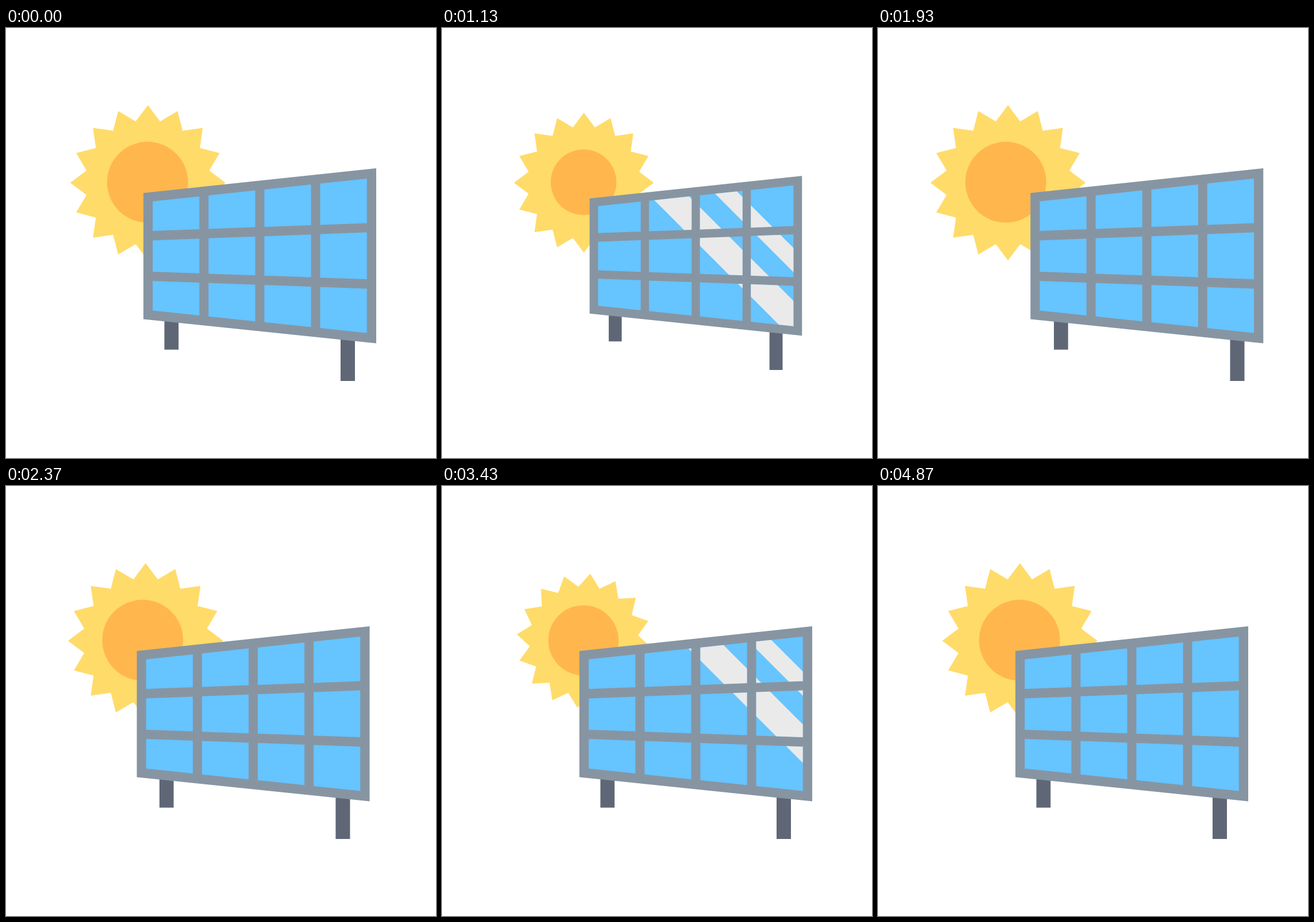
These frames come from a looping animation (748 px wide and 748 px high, 5 s). An HTML page with a canvas:

```html
<!DOCTYPE html>
<html lang="en">
<head>
<meta charset="utf-8">
<title>Solar panel</title>
<style>
  html, body { margin: 0; width: 100%; height: 100%; overflow: hidden; background: #fff; }
  canvas { display: block; }
</style>
</head>
<body>
<canvas id="stage" width="748" height="748"></canvas>
<script>
const ctx = document.getElementById('stage').getContext('2d');
const LOOP = 5000, FPS = 30;
const SUN = { x: 246.8, y: 269.2 }, PANEL = { x: 441.5, y: 396.3 };

// Symmetric ease, cubic-bezier(.5, 0, .5, 1), solved by bisection.
function ease(p) {
  let lo = 0, hi = 1;
  for (let i = 0; i < 24; i++) {
    const t = (lo + hi) / 2;
    if (1.5 * t * (1 - t) + t ** 3 < p) lo = t; else hi = t;
  }
  return lo * lo * (3 - 2 * lo);
}

// Eased value at frame n for the given key times and values.
function track(n, times, values) {
  if (n <= times[0]) return values[0];
  for (let i = 1; i < times.length; i++) {
    if (n < times[i]) {
      const p = (n - times[i - 1]) / (times[i] - times[i - 1]);
      return values[i - 1] + (values[i] - values[i - 1]) * ease(p);
    }
  }
  return values[values.length - 1];
}

const beat = start => [0, 15, 30, 45].map(k => start + k);
const pulse = (n, start) => track(n, beat(start), [1, 1.1, 0.9, 1]);
const sway = (n, start, amp) => track(n, beat(start), [0, amp, -amp, 0]);

function polygon(points) {
  const path = new Path2D();
  points.forEach(([x, y]) => path.lineTo(x, y));
  path.closePath();
  return path;
}

function fill(path, color) {
  ctx.fillStyle = color;
  ctx.fill(path);
}

const rays = polygon(Array.from({ length: 32 }, (_, i) => {
  const r = i % 2 ? 108.8 : 135, a = i * Math.PI / 16;
  return [r * Math.sin(a), -r * Math.cos(a)];
}));

const frame = polygon([[239, 287], [644, 244], [644, 548.5], [239, 506.5]]);

// Each row: top and bottom edge heights at the left and right end.
const rows = [
  [301.5, 262, 353, 339.5],
  [369.5, 355.5, 424, 437],
  [440, 453.5, 491.5, 530.5]
];
const cells = new Path2D();
for (const [t0, t1, b0, b1] of rows) {
  for (let col = 0; col < 4; col++) {
    const l = 255.2 + col * 97.1, r = l + 81.2;
    const at = (x, a, b) => a + (b - a) * (x - 255.2) / 372.5;
    cells.addPath(polygon([[l, at(l, t0, t1)], [r, at(r, t0, t1)],
                           [r, at(r, b0, b1)], [l, at(l, b0, b1)]]));
  }
}

function scaleAbout(c, s) {
  ctx.translate(c.x, c.y);
  ctx.scale(s, s);
  ctx.translate(-c.x, -c.y);
}

function drawSun(n) {
  const spin = [92, 107.5, 125, 146];
  const scale = pulse(n, 3) * track(n, spin, [1, 0.845, 1.235, 1]);
  ctx.save();
  ctx.translate(SUN.x + sway(n, 49, -29.9), SUN.y);
  ctx.scale(scale, scale);
  ctx.rotate(track(n, spin, [0, -20, 20, 0]) * Math.PI / 180);
  fill(rays, '#ffdb69');
  const disc = new Path2D();
  disc.arc(sway(n, 51, -7.5) - 0.6, -1, 70.4 * pulse(n, 5), 0, 7);
  fill(disc, '#ffb74d');
  ctx.restore();
}

// Diagonal band covering a <= x - y <= b.
const band = (a, b) => polygon([[a, 0], [b, 0], [b + 748, 748], [a + 748, 748]]);

function drawPanel(n) {
  ctx.save();
  ctx.translate(sway(n, 47, 29.9), 0);
  scaleAbout(PANEL, pulse(n, 0));

  ctx.save();
  ctx.translate(sway(n, 50, 7.5), 0);
  ctx.fillStyle = '#5f6777';
  ctx.fillRect(275.5, 490, 24.7, 69.5);
  ctx.fillRect(582, 520, 25, 94);
  ctx.restore();

  fill(frame, '#8795a2');
  fill(cells, '#66c4ff');
  ctx.clip(cells);
  // The glint crosses the stage at its own size, seen only through the cells.
  ctx.setTransform(1, 0, 0, 1, 0, 0);
  const edge = n < 75 ? 293 - 18.6 * (n - 22) : -133 - 18.6 * (n - 118);
  fill(band(edge, edge + 67), '#eaeaea');
  fill(band(edge + 117, edge + 159), '#eaeaea');
  ctx.restore();
}

function draw(now) {
  const n = Math.floor((now % LOOP + 4) * FPS / 1000);
  ctx.fillStyle = '#fff';
  ctx.fillRect(0, 0, 748, 748);
  drawSun(n);
  drawPanel(n);
}

let start;
function tick(now) {
  start ??= now;
  draw(now - start);
  requestAnimationFrame(tick);
}
draw(0);
requestAnimationFrame(tick);
</script>
</body>
</html>
```
